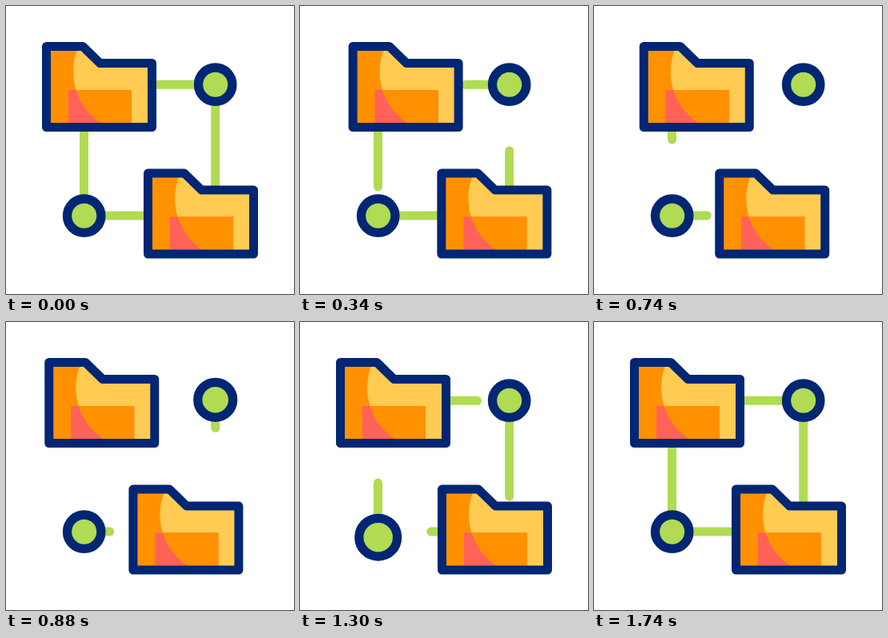
An HTML page that plays this animation: 360x360 px, repeating every 1800 ms.

```html
<!DOCTYPE html>
<html lang="en">
<head>
<meta charset="utf-8">
<title>Folder sync</title>
<style>
  html, body { margin: 0; width: 100%; height: 100%; overflow: hidden; background: #fff; }
  svg { display: block; width: 100vw; height: 100vh; }
  .link { stroke: #b0db53; stroke-width: 11; stroke-linecap: round; }
  .node { fill: #b0db53; stroke: #002674; stroke-width: 11.3; }
  .edge { fill: none; stroke: #002674; stroke-width: 11; stroke-linejoin: round; }
</style>
</head>
<body>
<svg viewBox="0 0 360 360">
  <defs>
    <path id="shape" d="M50.5 50.5H96L117.500 71.500H182.500V151.500H50.500Z"/>
    <clipPath id="inside"><use href="#shape"/></clipPath>
    <g id="folder">
      <g clip-path="url(#inside)">
        <path fill="#ff9100" d="M45 45H190V160H45Z"/>
        <circle cx="161" cy="82" r="77" fill="#ffcb52"/>
        <path fill="#ff6258" d="M78 105H157V146H78Z"/>
        <path fill="#ff9100" d="M87.500 105H157V146H118A77 77 0 0 1 87.500 105Z"/>
      </g>
      <use href="#shape" class="edge"/>
    </g>
  </defs>
  <g id="links"></g>
  <circle id="nodeA" class="node" cx="261.7"/>
  <circle id="nodeB" class="node" cx="97.7"/>
  <use id="folderA" href="#folder"/>
  <use id="folderB" href="#folder"/>
</svg>
<script>
const LOOP = 1800, LAST = 1740;
const $ = id => document.getElementById(id);
const clamp = v => Math.max(0, Math.min(1, v));
const mix = (a, b, k) => a + (b - a) * k;
const progress = (t, start, length) => clamp((t - start) / length);
const pulse = (t, start, length) => (1 - Math.cos(2 * Math.PI * progress(t, start, length))) / 2;

// Each link runs from its start node to its end node: the tail leaves first,
// then a new head grows out. "edge" holds the visible limits.
const links = [
  { axis: 'x', at: 98.3, from: 170, to: 262, edge: [188, 235], shrink: [112, 570], grow: [980, 450] },
  { axis: 'y', at: 261.7, from: 98, to: 232, edge: [125, 226], shrink: [30, 560], grow: [845, 495] },
  { axis: 'x', at: 262, from: 190, to: 98, edge: [172, 125], shrink: [367, 570], grow: [1220, 470] },
  { axis: 'y', at: 97.5, from: 262, to: 140, edge: [236, 151], shrink: [272, 578], grow: [1097, 495] }
];
for (const link of links) {
  link.el = document.createElementNS('http://www.w3.org/2000/svg', 'line');
  link.el.setAttribute('class', 'link');
  $('links').append(link.el);
}

function drawLink({ el, axis, at, from, to, edge, shrink, grow }, t) {
  const gone = progress(t, ...shrink), grown = progress(t, ...grow);
  const growing = t >= grow[0];
  const start = !growing && gone > 0 ? mix(...edge, gone) : from;
  const end = growing && grown < 1 ? mix(...edge, grown) : to;
  const cross = axis === 'x' ? 'y' : 'x';
  el.setAttribute(axis + 1, start);
  el.setAttribute(axis + 2, end);
  el.setAttribute(cross + 1, at);
  el.setAttribute(cross + 2, at);
  el.setAttribute('visibility', gone === 1 && !growing ? 'hidden' : 'visible');
}

function drawNode(id, y, shift, amount) {
  $(id).setAttribute('cy', y + shift * amount);
  $(id).setAttribute('r', 21.2 + 2.7 * amount);
}

function render(t) {
  links.forEach(link => drawLink(link, t));
  drawNode('nodeA', 98.2, -3.3, pulse(t, 800, 460));
  drawNode('nodeB', 262.2, 7, pulse(t, 1065, 460));
  $('folderA').setAttribute('transform', `translate(${21 * pulse(t, 10, 1000)} 0)`);
  $('folderB').setAttribute('transform', `translate(${127 - 21 * pulse(t, 287, 974)} 158.600)`);
}

const begin = performance.now();
function frame() {
  render(Math.min((performance.now() - begin) % LOOP, LAST));
  requestAnimationFrame(frame);
}
frame();
</script>
</body>
</html>
```
